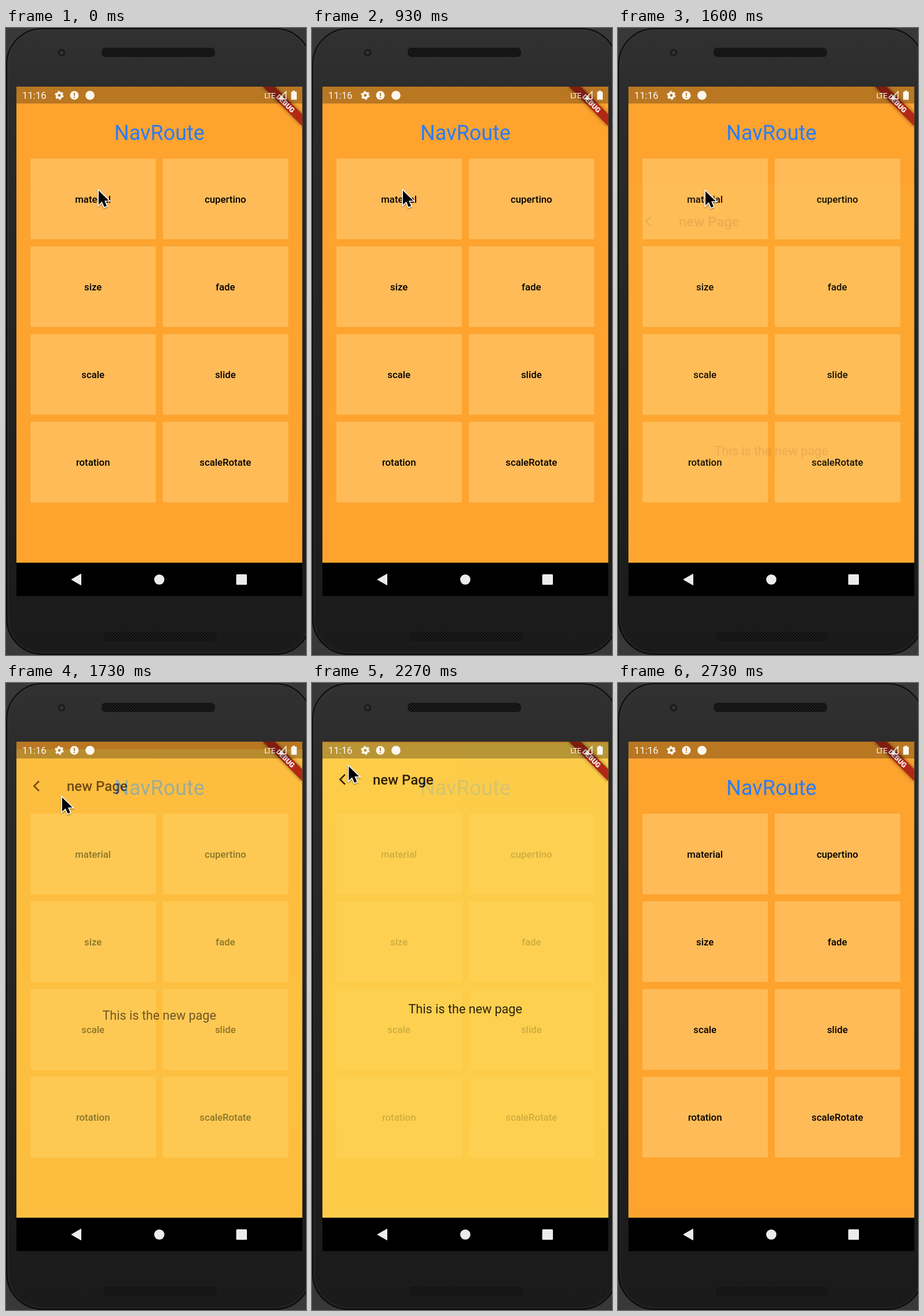
Animation, 518 px wide and 1080 px high, one loop 2790 ms. Source, as an HTML page:

```html
<!DOCTYPE html>
<html lang="en">
<head>
<meta charset="utf-8">
<title>Page transition</title>
<style>
  html, body { margin: 0; height: 100%; overflow: hidden; background: #383838; }
  svg { display: block; width: 100vw; height: 100vh; font-family: Roboto, sans-serif; }
  .mid { text-anchor: middle; }
  .label { font-size: 16.8px; font-weight: 500; }
</style>
</head>
<body>
<svg viewBox="0 0 518 1080">
  <defs>
    <linearGradient id="body" x2="0" y2="1">
      <stop offset="0" stop-color="#313131"/>
      <stop offset=".12" stop-color="#2b2b2b"/>
      <stop offset=".85" stop-color="#1d1d1d"/>
      <stop offset="1" stop-color="#1a1a1a"/>
    </linearGradient>
    <pattern id="mesh" width="5" height="5" patternUnits="userSpaceOnUse">
      <circle cx="1.2" cy="1.2" r="1" fill="#2a2a2a"/>
      <circle cx="3.7" cy="3.7" r="1" fill="#2a2a2a"/>
    </pattern>
    <clipPath id="screen"><rect x="18" y="101" width="493.5" height="820"/></clipPath>
    <filter id="blur" x="-20%" y="-100%" width="140%" height="300%"><feGaussianBlur stdDeviation="3"/></filter>
    <filter id="drop" x="-50%" y="-50%" width="200%" height="200%">
      <feDropShadow dx="0" dy="1.5" stdDeviation="1.2" flood-opacity=".45"/>
    </filter>
  </defs>

  <!-- phone -->
  <rect x="1" y="1" width="526" height="1078" rx="62" fill="url(#body)" stroke="#0c0c0c" stroke-width="2"/>
  <rect x="4" y="4" width="520" height="1072" rx="59" fill="none" stroke="#3a3a3a" stroke-opacity=".6"/>
  <circle cx="96" cy="42.5" r="6.5" fill="#1c1c1c"/>
  <circle cx="96" cy="42.5" r="3" fill="#343434"/>
  <g id="speakers"></g>

  <g clip-path="url(#screen)">
    <rect x="18" y="101" width="494" height="820" fill="#fda32e"/>
    <text class="mid" x="265" y="193" font-size="36" fill="#2b7cf5">NavRoute</text>
    <g id="tiles"></g>

    <g id="page">
      <rect x="18" y="101" width="494" height="820" fill="#fdd64f"/>
      <path d="M57 156l-8.5 8.5 8.5 8.5" fill="none" stroke="#000" stroke-width="2.6"/>
      <text x="105" y="173" font-size="24" font-weight="500">new Page</text>
      <text class="mid" x="264.7" y="567" font-size="21.6">This is the new page</text>
    </g>

    <g transform="translate(511.5 101) rotate(45)">
      <rect x="-48" y="33.6" width="96" height="14.4" opacity=".5" filter="url(#blur)"/>
      <rect x="-48" y="33.6" width="96" height="14.4" fill="#b12814"/>
      <text class="mid" y="45.2" font-size="12.2" font-weight="900" fill="#fff">DEBUG</text>
    </g>
    <rect x="18" y="101" width="494" height="29" opacity=".27"/>
  </g>

  <!-- status bar -->
  <g fill="#fbf7f0">
    <text x="28" y="122" font-size="16.8">11:16</text>
    <circle cx="92" cy="116" r="4.2" fill="none" stroke="#fbf7f0" stroke-width="3.6"/>
    <circle cx="92" cy="116" r="6.4" fill="none" stroke="#fbf7f0" stroke-width="2.4" stroke-dasharray="3.4 3.3"/>
    <circle cx="118" cy="116" r="7.5"/>
    <path d="M117.2 111.5h1.8v5.5h-1.8zM117.2 118.6h1.8v1.8h-1.8z" fill="#b47427"/>
    <circle cx="145" cy="116" r="7.8"/>
    <text x="446" y="120.5" font-size="13.5" letter-spacing="-.9">LTE</text>
    <path d="M471 122.3L483.5 109.5V122.3z" fill="none" stroke="#fbf7f0" stroke-width="1.5"/>
    <path d="M474 117l5 5m0-5l-5 5" stroke="#fbf7f0" stroke-width="1.3"/>
    <path d="M495 108h4v1.8h3V123.5h-9.6V109.8h2.6z"/>
  </g>

  <!-- navigation bar -->
  <rect x="18" y="921" width="493.5" height="57.5"/>
  <g fill="#ececec">
    <path d="M113 950l16.5-9.5v19z" stroke="#ececec" stroke-linejoin="round"/>
    <circle cx="264.7" cy="950" r="8.8"/>
    <rect x="397.5" y="941" width="18.5" height="18" rx="1.5"/>
  </g>

  <path id="cursor" d="M1 3V27.500L6.800 22 10.800 31.200 15 29.400 11 20.500H18.800z"
        stroke="#fff" stroke-width="3" paint-order="stroke" filter="url(#drop)"/>
</svg>
<script>
const $ = id => document.getElementById(id);

$('speakers').innerHTML = [[165, 34], [168, 1040]].map(([x, y]) =>
  ['#0f0f0f', 'url(#mesh)'].map(fill =>
    `<rect x="${x}" y="${y}" width="196" height="16" rx="7" fill="${fill}"/>`).join('')).join('');

const names = ['material', 'cupertino', 'size', 'fade', 'scale', 'slide', 'rotation', 'scaleRotate'];
$('tiles').innerHTML = names.map((name, i) => {
  const x = 42.2 + i % 2 * 228.6, y = 225 + (i >> 1) * 151.1;
  return `<rect x="${x}" y="${y}" width="216.6" height="139" rx="2" fill="#ffbb58"/>
    <text class="label mid" x="${x + 108}" y="${y + 75.7}">${name}</text>`;
}).join('');

const LOOP = 2790, FPS = 15, SLIDE = 205, TIME = 282, OPEN = 1537, CLOSE = 2233;
const HIDE = 2440;
// cursor stops: time, x, y
const stops = [
  [0, 159, 277], [267, 156, 277], [933, 156, 277], [1400, 150, 278], [1600, 150, 278],
  [1733, 96, 194], [1867, 58, 146], [1933, 53, 142], [2200, 53, 142], [2333, 72, 139], [2400, 92, 18]
];

const clamp = v => Math.min(1, Math.max(0, v));

// cubic-bezier(x1, 0, x2, 1)
function ease(x1, x2, p) {
  let lo = 0, hi = 1, s;
  for (let i = 0; i < 24; i++) {
    s = (lo + hi) / 2;
    const x = 3 * (1 - s) ** 2 * s * x1 + 3 * (1 - s) * s * s * x2 + s ** 3;
    if (x < p) lo = s; else hi = s;
  }
  return s * s * (3 - 2 * s);
}

function cursorAt(t) {
  const i = stops.findIndex(s => s[0] > t);
  if (i < 0) return stops.at(-1).slice(1);
  const [a, b] = [stops[i - 1], stops[i]];
  const k = (t - a[0]) / (b[0] - a[0]);
  return [1, 2].map(n => a[n] + (b[n] - a[n]) * k);
}

function draw(now) {
  const t = Math.floor((now % LOOP + 4) * FPS / 1000) * 1000 / FPS;
  const p = clamp(Math.min((t - OPEN) / TIME, 1 - (t - CLOSE) / TIME));
  $('page').setAttribute('opacity', p && ease(.42, 1, p));
  $('page').setAttribute('transform', `translate(0 ${SLIDE * (1 - ease(.4, .2, p))})`);
  $('cursor').setAttribute('transform', `translate(${cursorAt(t)})`);
  $('cursor').setAttribute('visibility', t < HIDE ? 'visible' : 'hidden');
  requestAnimationFrame(draw);
}
draw(performance.now());
</script>
</body>
</html>
```
